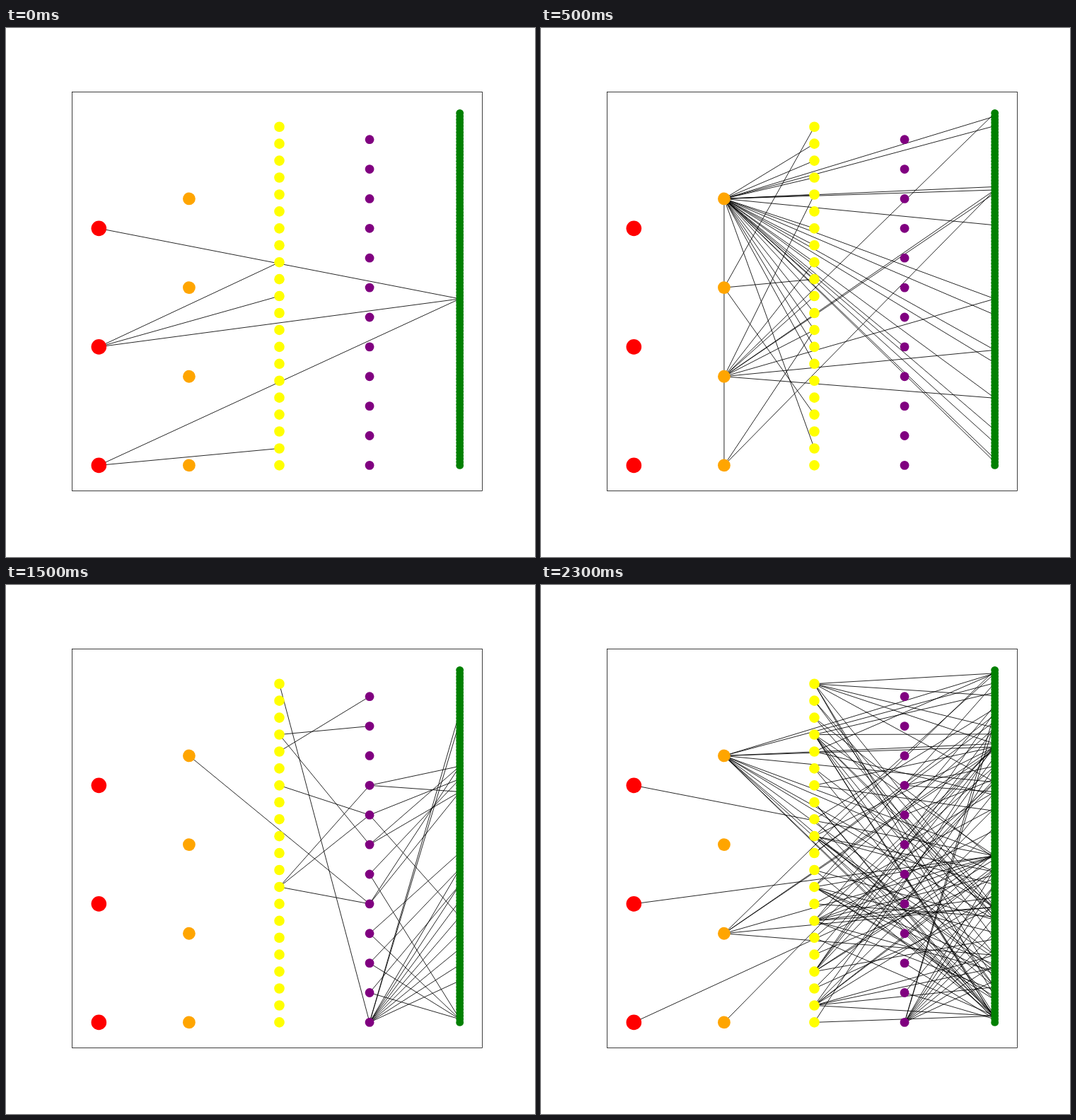
Write an HTML page that moves like this. It is 748 by 748 pixels and loops after 2.5 s.

```html
<!DOCTYPE html>
<html lang="en">
<head>
<meta charset="utf-8">
<title>Layered graph</title>
<style>
  html, body { margin: 0; width: 100%; height: 100%; overflow: hidden; background: #fff; }
  svg { display: block; width: 748px; height: 748px; }
  .edges { stroke: #000; stroke-width: .85; visibility: hidden; animation: show 2.5s step-end infinite; }
  .frame { fill: none; stroke: #000; stroke-width: .75; }
  @keyframes show {
    0% { visibility: visible; }
    20%, 100% { visibility: hidden; }
  }
</style>
</head>
<body>
<svg id="stage" viewBox="0 0 748 748"></svg>
<script>
const RED = 0, ORANGE = 1, YELLOW = 2, PURPLE = 3, GREEN = 4;
const layers = [
  { color: 'red', count: 3, r: 10.8 },
  { color: 'orange', count: 4, r: 8.9 },
  { color: 'yellow', count: 21, r: 7.3 },
  { color: 'purple', count: 12, r: 6.4 },
  { color: 'green', count: 111, r: 5.4 }
];
const stage = document.getElementById('stage');

// Nodes are numbered upwards from the bottom of each column.
const nodeX = layer => 131.3 + 127.6 * layer;
const nodeY = (layer, i) => 618.4 - 502.6 * i / layers[layer].count;

function add(parent, tag, attrs) {
  const el = document.createElementNS('http://www.w3.org/2000/svg', tag);
  for (const key in attrs) el.setAttribute(key, attrs[key]);
  return parent.appendChild(el);
}

let seed = 7;
const random = () => (seed = seed * 16807 % 2147483647) / 2147483647;
const pick = list => list[Math.floor(random() * list.length)];
const range = (from, to, step = 1) =>
  Array.from({ length: Math.floor((to - from) / step) + 1 }, (_, n) => from + n * step);

const edges = [];
function fan(from, i, to, targets) {
  for (const j of new Set(targets)) edges.push({ from, i, to, j });
}

// Well-connected nodes attract most of the edges.
const greenHubs = [109, 106, 87, 86, 75, 52, 47, 36, 32, 21, 11, 7, 2, 1];
const yellowHubs = [20, 17, 11, 8, 6, 3, 1];

for (const i of range(0, 2)) fan(RED, i, GREEN, [52]);
fan(RED, 0, YELLOW, [1]);
fan(RED, 1, YELLOW, [10, 12]);

fan(ORANGE, 0, ORANGE, [3]);
fan(ORANGE, 0, YELLOW, [8]);
fan(ORANGE, 1, YELLOW, [8, 10, 12, 16]);
fan(ORANGE, 2, YELLOW, [3, 11, 20]);
fan(ORANGE, 3, YELLOW, [1, ...range(6, 14), ...range(16, 19)]);
fan(ORANGE, 3, PURPLE, [4]);
fan(ORANGE, 0, GREEN, [86]);
fan(ORANGE, 1, GREEN, [21, 36, 52, 85, 86, 110]);
fan(ORANGE, 3, GREEN, greenHubs);

fan(YELLOW, 0, YELLOW, [20]);
fan(YELLOW, 8, PURPLE, [4, 7, 8]);
fan(YELLOW, 14, PURPLE, [7]);
fan(YELLOW, 16, PURPLE, [11]);
fan(YELLOW, 17, PURPLE, [6, 10]);
fan(YELLOW, 20, PURPLE, [0]);
for (const i of range(0, 20)) {
  const degree = yellowHubs.includes(i) ? 9 : 2;
  fan(YELLOW, i, GREEN, range(1, degree).map(() =>
    random() < .5 ? pick(greenHubs) : Math.floor(110 * random() ** 1.3)));
}

fan(PURPLE, 0, GREEN, [...range(13, 52, 5), 94, 97]);
for (const i of range(1, 3)) fan(PURPLE, i, GREEN, [1, 38 + 5 * i]);
for (const i of range(4, 8)) fan(PURPLE, i, GREEN, i % 2 ? [1 + 16 * (i - 5), 76] : [72, 80]);

add(stage, 'rect', { class: 'frame', x: 93.5, y: 90.5, width: 580, height: 564 });

// Each column in turn shows every edge that touches it.
layers.forEach((_, k) => {
  const group = add(stage, 'g', { class: 'edges', style: `animation-delay:${(k - 5) * 500}ms` });
  for (const { from, i, to, j } of edges) {
    if (from !== k && to !== k) continue;
    add(group, 'line', {
      x1: nodeX(from), y1: nodeY(from, i),
      x2: nodeX(to), y2: nodeY(to, j)
    });
  }
});

layers.forEach(({ color, count, r }, k) => {
  for (let i = 0; i < count; i++)
    add(stage, 'circle', { cx: nodeX(k), cy: nodeY(k, i), r, fill: color });
});
</script>
</body>
</html>
```
